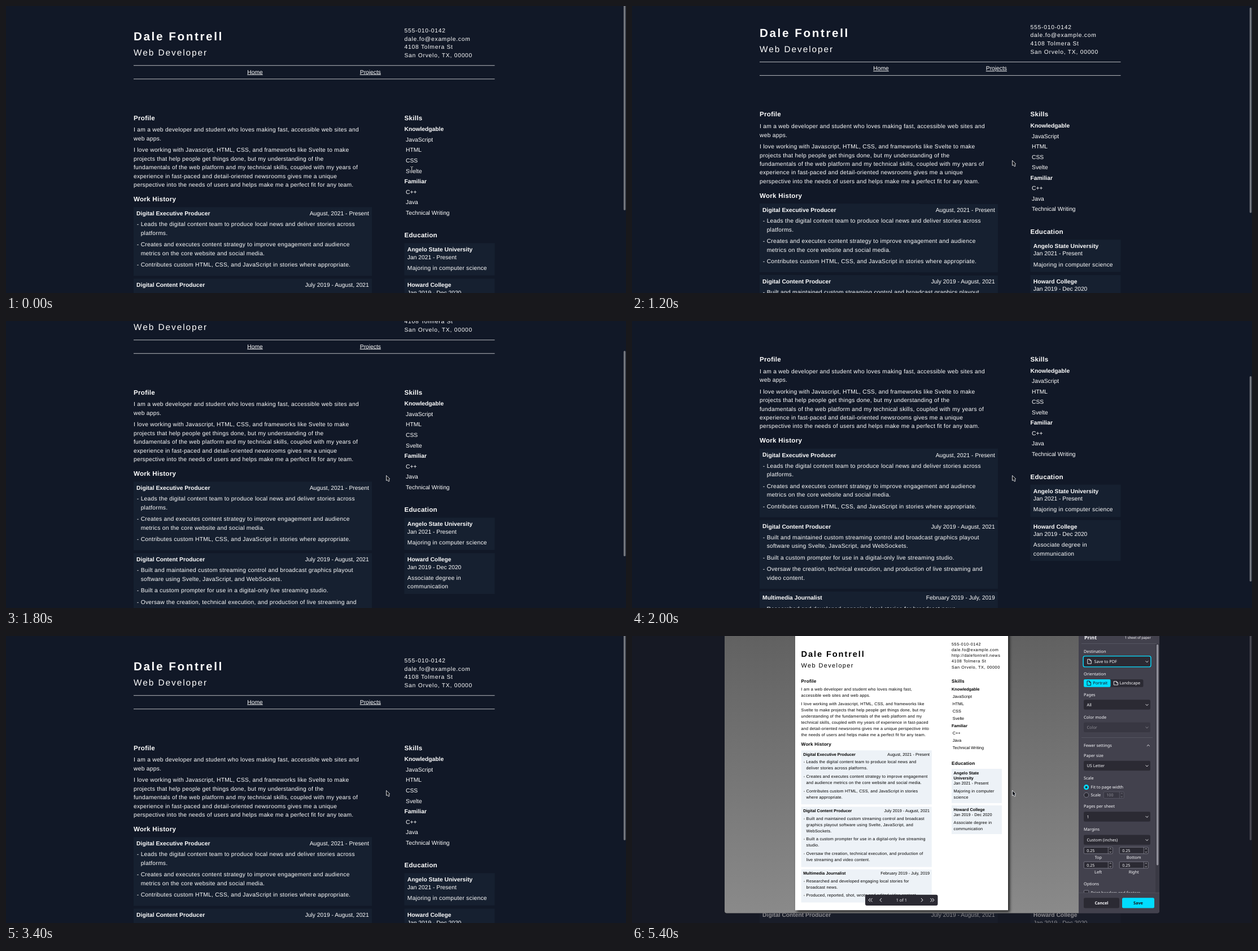
Recreate the animation shown at these times as an HTML page. Size 1098 by 510 pixels, loop 8000 ms.

```html
<!DOCTYPE html>
<html lang="en">
<head>
<meta charset="utf-8">
<title>Resume print preview</title>
<style>
  html, body { margin: 0; width: 100%; height: 100%; overflow: hidden; background: #111827; }
  svg { display: block; width: 1098px; height: 510px; }
  text { font-family: "Liberation Sans", Arial, sans-serif; text-rendering: geometricPrecision; white-space: pre; }
  .ui text { font-family: "Noto Sans", "Open Sans", sans-serif; }
  .ui .resume text { font-family: "Liberation Sans", Arial, sans-serif; }
  .sheet { filter: drop-shadow(3.2px 3.2px 2.6px #202020); }
</style>
</head>
<body>
<svg id="stage" viewBox="0 0 1098 510"></svg>
<script>
const LOOP = 8000;
const stage = document.getElementById('stage');

function el(parent, tag, attrs = {}, content) {
  const node = document.createElementNS('http://www.w3.org/2000/svg', tag);
  for (const key in attrs) node.setAttribute(key, attrs[key]);
  if (content !== undefined) node.textContent = content;
  return parent.appendChild(node);
}
const group = (parent, attrs) => el(parent, 'g', attrs);
const box = (parent, x, y, w, h, fill, more = {}) =>
  el(parent, 'rect', { x, y, width: w, height: h, fill, ...more });
const line = (parent, d, stroke, width = 1) =>
  el(parent, 'path', { d, stroke, 'stroke-width': width, fill: 'none' });

function say(parent, x, y, str, size, { track = 0, ...more } = {}) {
  return el(parent, 'text', { x, y, 'font-size': size, 'letter-spacing': track * size, ...more }, str);
}
const BOLD = { 'font-weight': 700 };
const WIDE = { track: .025 };
// An invisible turn keeps baselines from snapping to whole pixels.
const UNSNAP = { transform: 'rotate(.003)' };

// ---- resume content: "|" marks a line break ----
const NAME = 'Dale Fontrell';
const PHONE = '555-010-0142', MAIL = 'dale.fo@example.com', SITE = 'http://dalefontrell.news';
const STREET = '4108 Tolmera St', CITY = 'San Orvelo, TX, 00000';
const SKILLS = ['*Knowledgable', 'JavaScript', 'HTML', 'CSS', 'Svelte', '*Familiar', 'C++', 'Java', 'Technical Writing'];
const JOBS = [
  ['Digital Executive Producer', 'August, 2021 - Present'],
  ['Digital Content Producer', 'July 2019 - August, 2021'],
  ['Multimedia Journalist', 'February 2019 - July, 2019']
];

const screenView = {
  u: 10.29, x: 226, side: 705.5, step: 18.55, ink: '#fff', card: '#162030',
  name: 61.4, role: 88.4, contactY: 47, contactStep: 14.6, contact: [PHONE, MAIL, STREET, CITY],
  heads: [202.5, 347, 411.2], skillsY: 222.3,
  profile: [223.4, [
    'I am a web developer and student who loves making fast, accessible web sites and|web apps.',
    'I love working with Javascript, HTML, CSS, and frameworks like Svelte to make|projects that help people get things done, but my understanding of the|fundamentals of the web platform and my technical skills, coupled with my years of|experience in fast-paced and detail-oriented newsrooms gives me a unique|perspective into the needs of users and helps make me a perfect fit for any team.'
  ]],
  jobWidth: 422, lead: 14.8, items: 34,
  jobs: [
    [357.4, 122, [
      'Leads the digital content team to produce local news and deliver stories across|platforms.',
      'Creates and executes content strategy to improve engagement and audience|metrics on the core website and social media.',
      'Contributes custom HTML, CSS, and JavaScript in stories where appropriate.']],
    [484.4, 122, [
      'Built and maintained custom streaming control and broadcast graphics playout|software using Svelte, JavaScript, and WebSockets.',
      'Built a custom prompter for use in a digital-only live streaming studio.',
      'Oversaw the creation, technical execution, and production of live streaming and|video content.']],
    [611.3, 122, ['Researched and developed engaging local stories for broadcast news.',
      'Produced, reported, shot, wrote and edited video content.']]
  ],
  schoolWidth: 160, schoolPad: 5.4, schoolLine: 13.2,
  schools: [
    [421.5, 57.3, 'Angelo State University', 'Jan 2021 - Present', 'Majoring in computer science'],
    [484.5, 72.4, 'Howard College', 'Jan 2019 - Dec 2020', 'Associate degree in|communication']
  ]
};

const paperView = {
  u: 7.32, x: 299.6, side: 566, step: 13.02, ink: '#000', card: '#edf2f7',
  name: 36.7, role: 56.3, contactY: 16.5, contactStep: 10.28, contact: [PHONE, MAIL, SITE, STREET, CITY],
  heads: [82.6, 195.3, 228.9], skillsY: 96.5,
  profile: [97, [
    'I am a web developer and student who loves making fast,|accessible web sites and web apps.',
    'I love working with Javascript, HTML, CSS, and frameworks like|Svelte to make projects that help people get things done, but my|understanding of the fundamentals of the web platform and my|technical skills, coupled with my years of experience in fast-paced|and detail-oriented newsrooms gives me a unique perspective into|the needs of users and helps make me a perfect fit for any team.'
  ]],
  jobWidth: 231.2, lead: 9.5, items: 23.1,
  jobs: [
    [203.3, 96, [
      'Leads the digital content team to produce local news and|deliver stories across platforms.',
      'Creates and executes content strategy to improve engagement|and audience metrics on the core website and social media.',
      'Contributes custom HTML, CSS, and JavaScript in stories|where appropriate.']],
    [303.5, 107, [
      'Built and maintained custom streaming control and broadcast|graphics playout software using Svelte, JavaScript, and|WebSockets.',
      'Built a custom prompter for use in a digital-only live streaming|studio.',
      'Oversaw the creation, technical execution, and production of|live streaming and video content.']],
    [414.6, 59, [
      'Researched and developed engaging local stories for|broadcast news.',
      'Produced, reported, shot, wrote and edited video content.']]
  ],
  schoolWidth: 89, schoolPad: 3.6, schoolLine: 9.4,
  schools: [
    [236, 61, 'Angelo State|University', 'Jan 2021 - Present', 'Majoring in computer|science'],
    [301, 51, 'Howard College', 'Jan 2019 - Dec 2020', 'Associate degree in|communication']
  ]
};

// Paragraphs step 2u apart, lines within them 1.5u.
function prose(g, x, y, paras, u, dashX) {
  for (const para of paras) {
    if (dashX) say(g, dashX, y, '-', u);
    para.split('|').forEach((str, i) => {
      if (i) y += 1.5 * u;
      say(g, x, y, str, u, WIDE);
    });
    y += 2 * u;
  }
}

function resume(parent, v) {
  const g = group(parent, { class: 'resume', fill: v.ink, ...UNSNAP }), { u, x, side } = v;
  say(g, x, v.name, NAME, 2.01 * u, { track: .125, ...BOLD });
  say(g, x, v.role, 'Web Developer', 1.5 * u, { track: .125 });
  v.contact.forEach((str, i) => say(g, side, v.contactY + i * v.contactStep, str, u, { track: .075 }));

  const head = (hx, y, str) => say(g, hx, y, str, 1.125 * u, { ...WIDE, ...BOLD });
  head(x, v.heads[0], 'Profile');
  head(side, v.heads[0], 'Skills');
  head(x, v.heads[1], 'Work History');
  head(side, v.heads[2], 'Education');
  prose(g, x, v.profile[0], v.profile[1], u);

  SKILLS.forEach((str, i) => {
    const y = v.skillsY + i * v.step;
    if (str[0] === '*') say(g, side, y, str.slice(1), u, BOLD);
    else say(g, side + .25 * u, y, str, u);
  });

  v.jobs.forEach(([y, h, items], i) => {
    const [title, date] = JOBS[i], pad = .5 * u;
    box(g, x, y, v.jobWidth, h, v.card);
    say(g, x + pad, y + v.lead, title, u, BOLD);
    say(g, x + v.jobWidth - pad, y + v.lead, date, u, { 'text-anchor': 'end' });
    prose(g, x + 1.23 * u, y + v.items, items, u, x + .57 * u);
  });

  for (const [top, h, title, date, note] of v.schools) {
    const sx = side + v.schoolPad;
    let y = top + v.lead;
    box(g, side, top, v.schoolWidth, h, v.card);
    for (const str of title.split('|')) {
      say(g, sx, y, str, u, BOLD);
      y += v.schoolLine;
    }
    say(g, sx, y, date, u);
    prose(g, sx, y + 1.88 * u, [note], u);
  }
  return g;
}

// ---- web page ----
box(stage, 0, 0, 1098, 510, '#111827');
const page = group(stage);
const site = resume(page, screenView);
for (const y of [105.7, 129.7]) line(site, `M226 ${y}H865.5`, '#fff', .7);
for (const [x, str] of [[427.3, 'Home'], [626.8, 'Projects']])
  say(site, x, 120.5, str, 10.29, { 'text-decoration': 'underline' });
const thumb = box(stage, 1093.8, 0, 3.4, 365, '#74777e', { rx: 1.7 });

// ---- print dialog ----
const dialog = group(stage, { class: 'ui' });
box(dialog, 0, 0, 1098, 510, '#1c1b22', { opacity: .5 });
const defs = el(dialog, 'defs');
box(el(defs, 'clipPath', { id: 'frame' }), 164, -10, 770, 502.6, '#000', { rx: 4 });
const fade = el(defs, 'linearGradient', { id: 'desk', x2: 0, y2: 1 });
el(fade, 'stop', { 'stop-color': '#606060' });
el(fade, 'stop', { offset: 1, 'stop-color': '#8a8a8a' });
const win = group(dialog, { 'clip-path': 'url(#frame)' });
box(win, 164, -10, 627, 503, '#2a2a2e');

const preview = group(win);
box(preview, 164, -12, 627, 505, 'url(#desk)');
box(preview, 289, -20, 377, 507.3, '#fff', { class: 'sheet' });
resume(preview, paperView);
box(preview, 413, 459.8, 128.5, 19.2, '#2b2a33', { rx: 3 });
line(preview, 'M422 466l-3 3.2 3 3.2m3.5-6.4l-3 3.2 3 3.2M442 466l-3 3.2 3 3.2M512 466l3 3.2-3 3.2M528.5 466l3 3.2-3 3.2m3.5-6.4l3 3.2-3 3.2', '#fbfbfe');
say(preview, 477.3, 472, '1 of 1', 7.3, { 'text-anchor': 'middle', fill: '#fbfbfe' });

const INK = '#fbfbfe', FIELD = '#2b2a33', CYAN = '#00ddff', EDGE = '#8f8f9d', DARK = '#15141a';
const side = group(win, { fill: INK, ...UNSNAP });
const label = (x, y, str, more) => say(side, x, y + 2.6, str, 7.3, more);
const chevron = (p, x, y, up = 1) => line(p, `M${x - 2.4} ${y - 1.2 * up}l2.4 ${2.4 * up} 2.4 ${-2.4 * up}`, INK, .9);
const docIcon = (x, y, color) => line(side, `M${x} ${y}h4l2.5 2.5v5.3h-6.5zm4 0v2.5h2.5`, color, .9);

function select(y, str, indent = 805.5, opacity = 1) {
  const g = group(side, { opacity });
  box(g, 800, y - 8.8, 118, 17.6, FIELD, { rx: 2.5 });
  say(g, indent, y + 2.6, str, 7.3);
  chevron(g, 912, y + .3);
}
function spinner(x, y, w, str, opacity = 1) {
  const g = group(side, { opacity });
  box(g, x, y - 5.8, w, 11.6, FIELD, { rx: 1.5, stroke: EDGE, 'stroke-width': .7 });
  line(g, `M${x + w - 8} ${y - 5.8}v11.6`, EDGE, .7);
  line(g, `M${x + w - 5.6} ${y - 2}l1.6-1.6 1.6 1.6m0 4l-1.6 1.6-1.6-1.6`, INK, .7);
  say(g, x + 5, y + 2.6, str, 7.1);
}

box(side, 791, -10, 143, 503, '#42414d');
say(side, 801, 6.2, 'Print', 8.9, BOLD);
say(side, 919, 5.2, '1 sheet of paper', 6.05, { 'text-anchor': 'end' });
line(side, 'M796 13.5H929', '#5b5b66', .8);
for (const [y, str] of [[27.3, 'Destination'], [67.4, 'Orientation'], [104, 'Pages'], [144.3, 'Color mode'],
  [194.3, 'Fewer settings'], [212.3, 'Paper size'], [252.6, 'Scale'], [302.8, 'Pages per sheet'],
  [343, 'Margins'], [440, 'Options']]) label(800, y, str);

select(45.2, 'Save to PDF', 818.5);
box(side, 799.1, 35.6, 119.8, 19.2, 'none', { rx: 3.2, stroke: CYAN, 'stroke-width': 1.4 });
docIcon(806.8, 41.3, INK);
box(side, 800, 77, 105.5, 13.6, FIELD, { rx: 2.5 });
box(side, 800, 77, 47.5, 13.6, CYAN, { rx: 2 });
docIcon(806, 79.9, DARK);
label(816.3, 83.7, 'Portrait', { fill: DARK });
line(side, 'M853.3 80.6h4.8l2.5 2.5v3.8h-7.3zm4.8 0v2.5h2.5', INK, .9);
label(863.5, 83.7, 'Landscape');
select(122, 'All');
select(162.2, 'Color', 805.5, .4);
line(side, 'M796 180.5H922', '#5b5b66', .8);
chevron(side, 914.3, 194.5, -1);
select(230.4, 'US Letter');

el(side, 'circle', { cx: 804.6, cy: 268.6, r: 3.3, fill: FIELD, stroke: CYAN, 'stroke-width': 2.6 });
el(side, 'circle', { cx: 804.6, cy: 282.6, r: 4.2, fill: FIELD, stroke: EDGE, 'stroke-width': .8 });
label(812.6, 268.5, 'Fit to page width');
label(812.6, 282.5, 'Scale');
spinner(835.3, 282.6, 36, '100', .4);
select(320.9, '1');
select(362.2, 'Custom (inches)');
for (const [x, y, str] of [[800.3, 381, 'Top'], [863.3, 381, 'Bottom'], [800.3, 406.9, 'Left'], [863.3, 406.9, 'Right']]) {
  spinner(x, y, 51, '0.25');
  label(x + 25.4, y + 12, str, { 'text-anchor': 'middle' });
}
box(side, 800.4, 452, 8.4, 8.4, FIELD, { rx: 1, stroke: EDGE, 'stroke-width': .8 });
label(812.6, 456, 'Print headers and footers');
box(side, 927, 14, 7, 442, '#3a3944');
box(side, 928.9, 15, 3.4, 392.5, '#8f8f99', { rx: 1.7 });
box(side, 791, 456, 143, 37, '#42414d');
line(side, 'M791 456.3H934', '#52525e', .8);
box(side, 800, 465.2, 63, 18.2, FIELD, { rx: 2.5 });
box(side, 868, 465.2, 57, 18.2, CYAN, { rx: 2.5 });
label(831.5, 474.3, 'Cancel', { 'text-anchor': 'middle', 'font-weight': 600 });
label(896.5, 474.3, 'Save', { 'text-anchor': 'middle', 'font-weight': 600, fill: DARK });

// ---- pointers, both drawn around their hot spot ----
const arrow = el(stage, 'path', {
  d: 'M.5.5V9.6L2.6 8.2 4.2 11.2 6 10.4 4.9 7.3 6.8 6.6Z',
  fill: '#10141d', stroke: '#fff', 'stroke-width': .8, 'stroke-linejoin': 'round'
});
const beam = group(stage, { transform: 'translate(718.6 290.5)' });
for (const [color, width] of [['#10141d', 2], ['#e8e8ea', .9]])
  line(beam, 'M-2.3-5q2 0 2.3 1q.3-1 2.3-1M0-4V4M-2.3 5q2 0 2.3-1q.3 1 2.3 1', color, width);

// ---- timeline: each row holds until the next ----
const SCROLL = [[0, 0], [1200, 6.3], [1300, 40], [1400, 65.5], [1800, 72], [1900, 106], [2000, 130.7], [3300, 62], [3400, 0]];
const POINTER = [[0, null], [400, [688, 281]], [500, [673.5, 274]], [900, [673, 274]]];
const PRINT_AT = 5200, PREVIEW_AT = 5400;
const at = (rows, t) => rows.filter(row => row[0] <= t).pop()[1];
const show = (node, on) => node.setAttribute('display', on ? 'inline' : 'none');

function draw(now) {
  const t = now % LOOP, y = at(SCROLL, t), pos = at(POINTER, t);
  page.setAttribute('transform', `translate(0 ${-y})`);
  thumb.setAttribute('y', -2 + y * .765);
  show(dialog, t >= PRINT_AT);
  show(preview, t >= PREVIEW_AT);
  show(beam, !pos);
  show(arrow, pos);
  if (pos) arrow.setAttribute('transform', `translate(${pos})`);
}

const start = performance.now();
function tick() {
  draw(performance.now() - start);
  requestAnimationFrame(tick);
}
tick();
</script>
</body>
</html>
```
